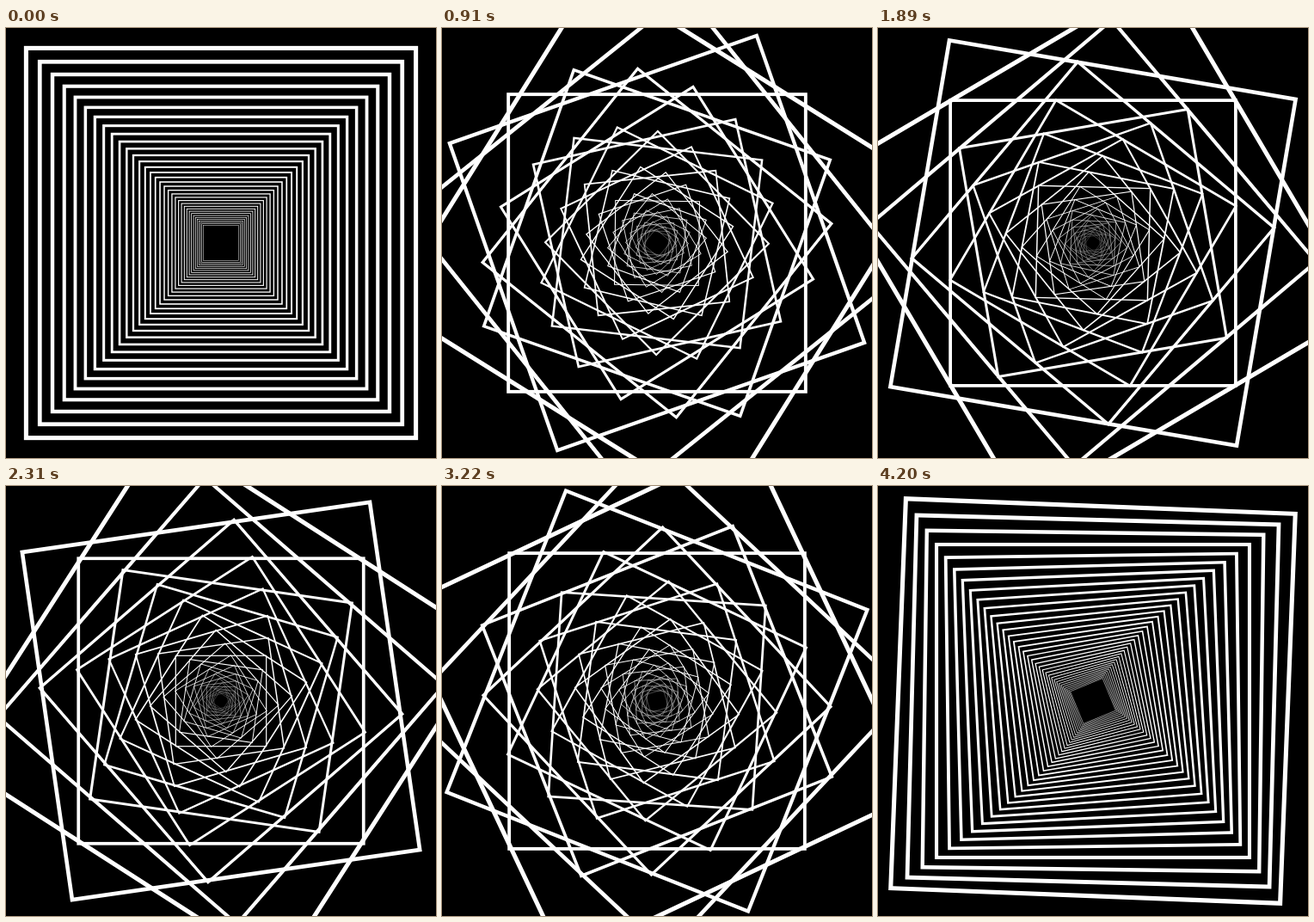
Animation of 500x500 px, one loop 4.27 s. Source, as an HTML page with a canvas:

```html
<!DOCTYPE html>
<html lang="en">
<head>
<meta charset="utf-8">
<title>Twisting squares</title>
<style>
  html, body { margin: 0; width: 100%; height: 100%; overflow: hidden; background: #000; }
  canvas { display: block; width: 500px; height: 500px; }
</style>
</head>
<body>
<canvas id="stage" width="500" height="500"></canvas>
<script>
const ctx = document.getElementById('stage').getContext('2d');

const STEP = 70;          // ms per pose
const STEPS = 61;
const CYCLE = 60.5;       // steps for a quarter turn between neighbours
const COUNT = 34;
const PIVOT = 3;          // index of the square that never turns
const HALF = 226.6;       // half side of the outermost square
const LINE = 5.1;
const RATIO_WIDE = 0.93;
const RATIO_TIGHT = 0.9005;

const bezier = (a, b, p) => 3 * (1 - p) ** 2 * p * a + 3 * (1 - p) * p * p * b + p ** 3;

// Leaves at constant speed and settles softly.
function settle(x) {
  let low = 0, high = 1;
  for (let i = 0; i < 24; i++) {
    const mid = (low + high) / 2;
    if (bezier(1 / 6, 2 / 3, mid) < x) low = mid; else high = mid;
  }
  return bezier(1 / 6, 1, low);
}

function draw(step) {
  const phase = step / CYCLE;
  const twist = phase * Math.PI / 2;
  const pulse = settle(1 - Math.abs(1 - 2 * phase));
  const ratio = RATIO_WIDE + (RATIO_TIGHT - RATIO_WIDE) * pulse;

  ctx.setTransform(1, 0, 0, 1, 0, 0);
  ctx.fillStyle = '#000';
  ctx.fillRect(0, 0, 500, 500);
  ctx.strokeStyle = '#fff';
  ctx.lineWidth = LINE;

  for (let i = 0; i < COUNT; i++) {
    const size = ratio ** i;
    ctx.setTransform(1, 0, 0, 1, 250, 250);
    ctx.rotate((i - PIVOT) * twist);
    ctx.scale(size, size);
    ctx.strokeRect(-HALF, -HALF, 2 * HALF, 2 * HALF);
  }
}

const start = performance.now();
let shown = -1;

function tick() {
  const step = Math.floor((performance.now() - start) / STEP) % STEPS;
  if (step !== shown) draw(shown = step);
  requestAnimationFrame(tick);
}
tick();
</script>
</body>
</html>
```
